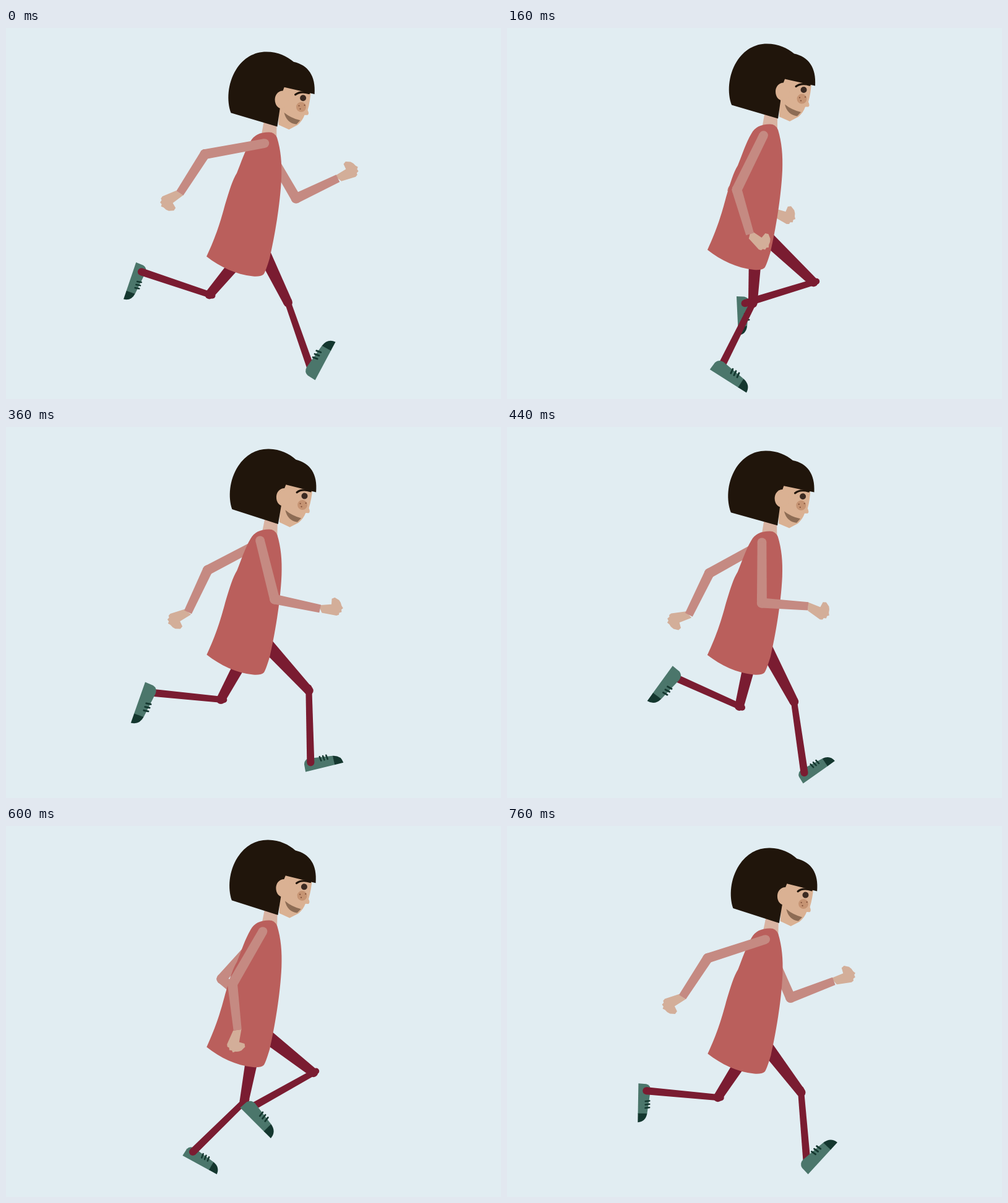
Write an HTML page with a canvas that moves like this. It is 800 px wide and 600 px high and loops after 800 ms.

```html
<!DOCTYPE html>
<html lang="en">
<head>
<meta charset="utf-8">
<title>Running girl</title>
<style>
  html, body { margin: 0; width: 100%; height: 100%; overflow: hidden; background: #e1edf2; }
  canvas { display: block; width: 800px; height: 600px; }
</style>
</head>
<body>
<canvas id="stage" width="800" height="600"></canvas>
<script>
const ctx = document.getElementById('stage').getContext('2d');
const LOOP = 800, STRIDE = LOOP / 2, STEP = 40;
const TURN = 2 * Math.PI, RAD = Math.PI / 180;
const C = {
  sky: '#e1edf2', hair: '#20150b', skin: '#dab193', hand: '#d3ae99', neck: '#d9b3a2',
  dress: '#ba5f5c', sleeve: '#c58a82', legging: '#7a1c31', shoe: '#4b766b', cap: '#14372f',
  cheek: '#c69473', freckle: '#80503a', mouth: '#8d6c54', eye: '#3b2a22'
};

// Joint angle in degrees: a mean plus [cos, sin] amplitudes of successive harmonics of the loop.
const wave = (mean, ...harmonics) => t => harmonics.reduce((sum, [a, b], i) => {
  const phase = TURN * (i + 1) * t / LOOP;
  return sum + a * Math.cos(phase) + b * Math.sin(phase);
}, mean);

// The torso moves once per stride, highest value at the given time.
const sway = (mean, amp, peak) => t => mean + amp * Math.cos(TURN * (t - peak) / STRIDE);
const bob = sway(-8.5, 8.4, 20);
const hipBob = sway(-6.2, 5.8, 0);
const lean = sway(.75, 1.9, 285);

const nearArm = {
  length: 98,
  shoulderX: upper => 412 - 6 * Math.cos(upper * RAD),
  upper: wave(118.2, [38.5, -8.3], [6.5, 7.6], [6.5, 0]),
  fore: wave(68.9, [53, -6], [-7.2, -7.5], [8, 1.6]),
  hand: wave(63, [62.6, -41.6], [8.3, .8], [6.4, .9])
};
const farArm = {
  length: 103,
  shoulderX: () => 417,
  upper: wave(119.4, [-42.2, .6], [-13, -.7], [-4.4, 0]),
  fore: wave(44.9, [-67.2, .7], [3.5, 1.2], [-6.8, 0]),
  hand: wave(63.5, [-97.5, -20.4], [-4.2, 0], [4, 1.6])
};
const nearLeg = {
  hipX: 403.5, thighLen: 118.5, shinLen: 113.5, size: 1, shoeOnTop: true,
  thigh: wave(78.4, [-24, 29.4], [11, 3], [-1.5, 0]),
  shin: wave(138.7, [-60.2, -14], [-4, 0], [-3.7, -6]),
  shoe: wave(41, [-86.6, -1.3], [-11, 2], [-5.4, -8.3])
};
const farLeg = {
  hipX: 407, thighLen: 122, shinLen: 116, size: .9, shoeOnTop: false,
  thigh: wave(77, [35, -30.9], [15.5, 7.4], [2.4, 8.1]),
  shin: wave(139.6, [56.3, 8.3], [.5, 5.2], [2.2, 4.8]),
  shoe: wave(44.4, [64, 26.3], [-5.7, 2], [6, 4.8])
};

const along = ([x, y], angle, len) => [x + len * Math.cos(angle * RAD), y + len * Math.sin(angle * RAD)];

function shape(color, d) {
  ctx.fillStyle = color;
  ctx.fill(new Path2D(d));
}

function line(color, width, d) {
  ctx.strokeStyle = color;
  ctx.lineWidth = width;
  ctx.lineCap = 'round';
  ctx.stroke(new Path2D(d));
}

function dot(color, x, y, r) {
  ctx.fillStyle = color;
  ctx.beginPath();
  ctx.arc(x, y, r, 0, TURN);
  ctx.fill();
}

function limb(color, a, ra, b, rb, roundEnd = true) {
  const angle = Math.atan2(b[1] - a[1], b[0] - a[0]);
  const nx = -Math.sin(angle), ny = Math.cos(angle);
  dot(color, a[0], a[1], ra);
  if (roundEnd) dot(color, b[0], b[1], rb);
  ctx.beginPath();
  ctx.moveTo(a[0] + nx * ra, a[1] + ny * ra);
  ctx.lineTo(b[0] + nx * rb, b[1] + ny * rb);
  ctx.lineTo(b[0] - nx * rb, b[1] - ny * rb);
  ctx.lineTo(a[0] - nx * ra, a[1] - ny * ra);
  ctx.fill();
}

function placed([x, y], angle, draw) {
  ctx.save();
  ctx.translate(x, y);
  ctx.rotate(angle * RAD);
  draw();
  ctx.restore();
}

function drawArm(arm, t) {
  const upper = arm.upper(t);
  const shoulder = [arm.shoulderX(upper), 187 + bob(t)];
  const elbow = along(shoulder, upper, arm.length);
  const wrist = along(elbow, arm.fore(t), 75);
  placed(wrist, arm.hand(t), () => shape(C.hand,
    'M-2 -6L19 -5L20.5 -14L25.5 -15.5L32 -10.5Q35 -6 35 -1L37 3L34 5L34 9L30 10L29 13L25 14L2 7Z'));
  limb(C.sleeve, shoulder, 7.3, elbow, 8);
  limb(C.sleeve, elbow, 8, wrist, 6.6, false);
}

function drawShoe(ankle, angle, size) {
  placed(ankle, angle, () => {
    ctx.scale(size, size);
    ctx.translate(-13, 14.5);
    shape(C.shoe, 'M0 0L1 -14Q3 -22 12 -22L54 -16.5L55 0Z');
    shape(C.cap, 'M54 -16.5Q69 -14 70 0L54 0Z');
    for (const x of [31, 37, 43]) line(C.cap, 2.8, `M${x} -20.5L${x + 1} -13`);
  });
}

function drawLeg(leg, t) {
  const hip = [leg.hipX, 338 + hipBob(t)];
  const knee = along(hip, leg.thigh(t), leg.thighLen);
  const shin = leg.shin(t);
  const ankle = along(knee, shin, leg.shinLen);
  const shoe = () => drawShoe(ankle, leg.shoe(t), leg.size);
  if (!leg.shoeOnTop) shoe();
  limb(C.legging, hip, 12, knee, 7.3);
  limb(C.legging, along(knee, shin, -5), 5, ankle, 6);
  if (leg.shoeOnTop) shoe();
}

function drawDress(t) {
  const top = bob(t), bottom = hipBob(t);
  ctx.save();
  ctx.translate(lean(t) * .25, 169 + top);
  ctx.scale(1, (233 + bottom - top) / 233);
  ctx.translate(0, -169);
  shape(C.dress, 'M425 169Q434 169 438 178C444 198 446 218 445 243C443 287 434 338 426 373'
    + 'Q419 396 416 399Q411 403 399 402C371 399 346 387 324 370C340 336 347 312 354 286'
    + 'C361 263 366 246 373 235C380 218 386 199 395 184Q403 169 425 169Z');
  ctx.restore();
}

function upperBody(t, draw) {
  placed([420, 230 + bob(t)], lean(t), () => {
    ctx.translate(-420, -230);
    draw();
  });
}

function drawNeck() {
  shape(C.neck, 'M417 148L437 156L437 182L411 182Z');
}

function drawHead() {
  shape(C.skin, 'M441 94L492 102Q491 119 487 133Q490 139 487 141L482 141Q479 150 471 157L457 164.5L440 157Z');
  shape(C.hair, 'M363 138C356 119 357 91 371 68C383 49 400 39 420 39C439 39 453 46 464 55'
    + 'C487 60 500 77 498 107L449 96L446 104L442 132L438 160Z');
  shape(C.skin, 'M449 102C439 101 434 109 434 116C434 124 438 130 445 131L456 125L456 103Z');
  line(C.hair, 3.2, 'M467 108Q475 101.5 489 105.5');
  dot(C.eye, 479.5, 113.5, 5);
  dot(C.cheek, 476.5, 128, 8);
  for (const [x, y] of [[473, 126], [482, 125], [475, 131]]) dot(C.freckle, x, y, 1.1);
  shape(C.mouth, 'M449 137Q460 146 475 149.5L469 156Q453 154 449 137Z');
}

function render(t) {
  ctx.fillStyle = C.sky;
  ctx.fillRect(0, 0, 800, 600);
  drawArm(farArm, t);
  drawLeg(farLeg, t);
  drawLeg(nearLeg, t);
  upperBody(t, drawNeck);
  drawDress(t);
  upperBody(t, drawHead);
  drawArm(nearArm, t);
}

const start = performance.now();
function tick() {
  const elapsed = (performance.now() - start) % LOOP;
  render(Math.floor(elapsed / STEP) * STEP);
  requestAnimationFrame(tick);
}
tick();
</script>
</body>
</html>
```
